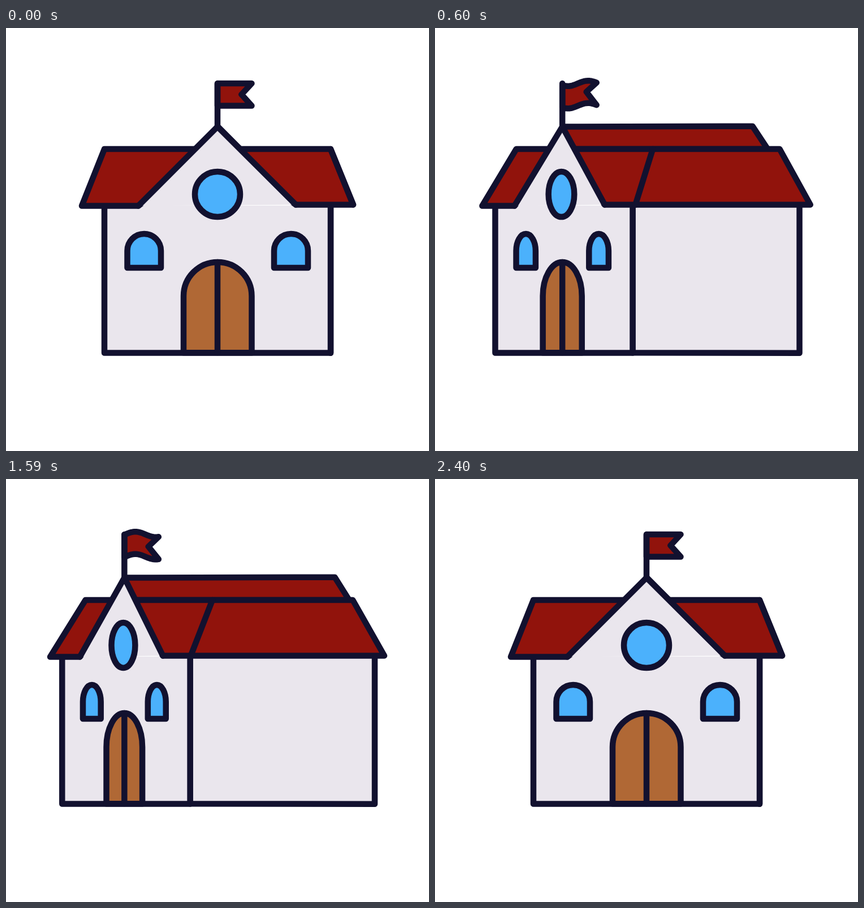
Write an HTML page that moves like this. It is 748 px wide and 748 px high and loops after 3.46 s.

```html
<!DOCTYPE html>
<html lang="en">
<head>
<meta charset="utf-8">
<title>Turning schoolhouse</title>
<style>
  html, body { margin: 0; width: 100%; height: 100%; overflow: hidden; background: #fff; }
  svg { display: block; width: 100%; height: 100%; }
  path { stroke: #12112f; stroke-width: 10.5; stroke-linecap: round; stroke-linejoin: round; fill: none; }
  .wall { fill: #eae6ed; }
  .roof { fill: #91130c; }
  .glass { fill: #4bb1fc; }
  .wood { fill: #b06835; }
</style>
</head>
<body>
<svg id="stage" viewBox="0 0 748 748"></svg>
<script>
const LOOP = 3460, TURN = 2400, HALF = TURN / 2, STEP = 30;
const stage = document.getElementById('stage');

function shape(cls) {
  const el = document.createElementNS('http://www.w3.org/2000/svg', 'path');
  if (cls) el.setAttribute('class', cls);
  stage.appendChild(el);
  return d => el.setAttribute('d', d);
}

// Creation order is paint order
const backRoof = shape('roof');
const sideWall = shape('wall');
const frontWall = shape('wall');
const sideRoof = shape('roof');
const ridge = shape();
const leftRoof = shape('roof');
const gable = shape('wall');
const roundWindow = shape('glass');
const leftWindow = shape('glass');
const rightWindow = shape('glass');
const door = shape('wood');
const doorSplit = shape();
const flag = shape('roof');
const pole = shape();

const line = (...pts) => 'M' + pts.map(p => p[0].toFixed(2) + ' ' + p[1].toFixed(2)).join('L');
const poly = (...pts) => line(...pts) + 'Z';

function arch(left, right, spring, base, height) {
  return `M${left} ${base}V${spring}A${(right - left) / 2} ${height} 0 0 1 ${right} ${spring}V${base}Z`;
}

function ellipse(cx, cy, rx, ry) {
  return `M${cx - rx} ${cy}a${rx} ${ry} 0 0 1 ${2 * rx} 0a${rx} ${ry} 0 0 1 ${-2 * rx} 0Z`;
}

// Bezier easing (.333, 0, .025, 1)
function ease(u) {
  let lo = 0, hi = 1;
  for (let i = 0; i < 30; i++) {
    const s = (lo + hi) / 2, r = 1 - s;
    const x = 3 * r * r * s * 0.333 + 3 * r * s * s * 0.025 + s * s * s;
    if (x < u) lo = s; else hi = s;
  }
  return lo * lo * (3 - 2 * lo);
}

function drawHouse(p) {
  const mix = (a, b) => a + (b - a) * p;
  const apex = mix(374, 201);
  const corner = mix(574, 313);
  const left = mix(174, 95.5);
  const right = mix(574, 656);
  const gableL = mix(234, 125.4);
  const gableR = mix(512.5, 265.5);

  backRoof(poly([apex, 174.5], [mix(374, 592), 173.7], [mix(414, 616.5), 214], [apex, 214]));
  sideWall(line([corner, 314], [corner, 574.2], [right, 574.8], [right, 314]));
  frontWall(line([left, 314], [left, 574.5], [corner, 574.5], [corner, 314]));
  sideRoof(poly([apex, 214], [mix(574, 615.2), 214], [mix(614, 671.8), 312.5], [gableR, 312.5]));
  ridge(line([mix(574, 354.4), 214], [mix(614, 312.2), 312.5]));
  leftRoof(poly([mix(174, 138.8), 214], [apex, 214], [gableL, 314.5], [mix(134, 75.2), 314.5]));
  gable(line([gableL, 314.5], [apex, 174.5], [gableR, 312.5]));

  roundWindow(ellipse(mix(374, 199), 294, mix(40, 20), 40));
  leftWindow(arch(mix(214.5, 132), mix(274, 162.3), 394, 424, 30));
  rightWindow(arch(mix(474, 239.5), mix(534, 270), 394, 424, 30));
  door(arch(mix(314, 170.6), mix(434.5, 231.3), 474, 574.3, 60));
  doorSplit(line([apex, 414], [apex, 574]));
  return apex;
}

function drawFlag(x, t) {
  const amp = 4.8 * Math.min(1, t / 350, (TURN - t) / 430);
  const phase = 2 * Math.PI * (t - 390) / 1560;
  const wave = d => amp * Math.cos(phase - d * Math.PI / 36);
  const at = (d, y) => [x + d, y + wave(d)];
  const top = [], bottom = [];
  for (let i = 0; i <= 20; i++) {
    const d = i * 60.5 / 20;
    top.push(at(d, 98));
    bottom.unshift(at(d, 137.5));
  }
  flag(poly(...top, at(42.5, 117.5), ...bottom));
  pole(line([x, 98 + Math.min(0, wave(0))], [x, 174]));
}

function draw(ms) {
  const t = Math.min(TURN, Math.floor((ms % LOOP) / STEP) * STEP);
  const turn = ease(Math.min(t, TURN - t) / HALF);
  drawFlag(drawHouse(turn), t);
}

const start = performance.now();
function tick() {
  draw(performance.now() - start);
  requestAnimationFrame(tick);
}
tick();
</script>
</body>
</html>
```
